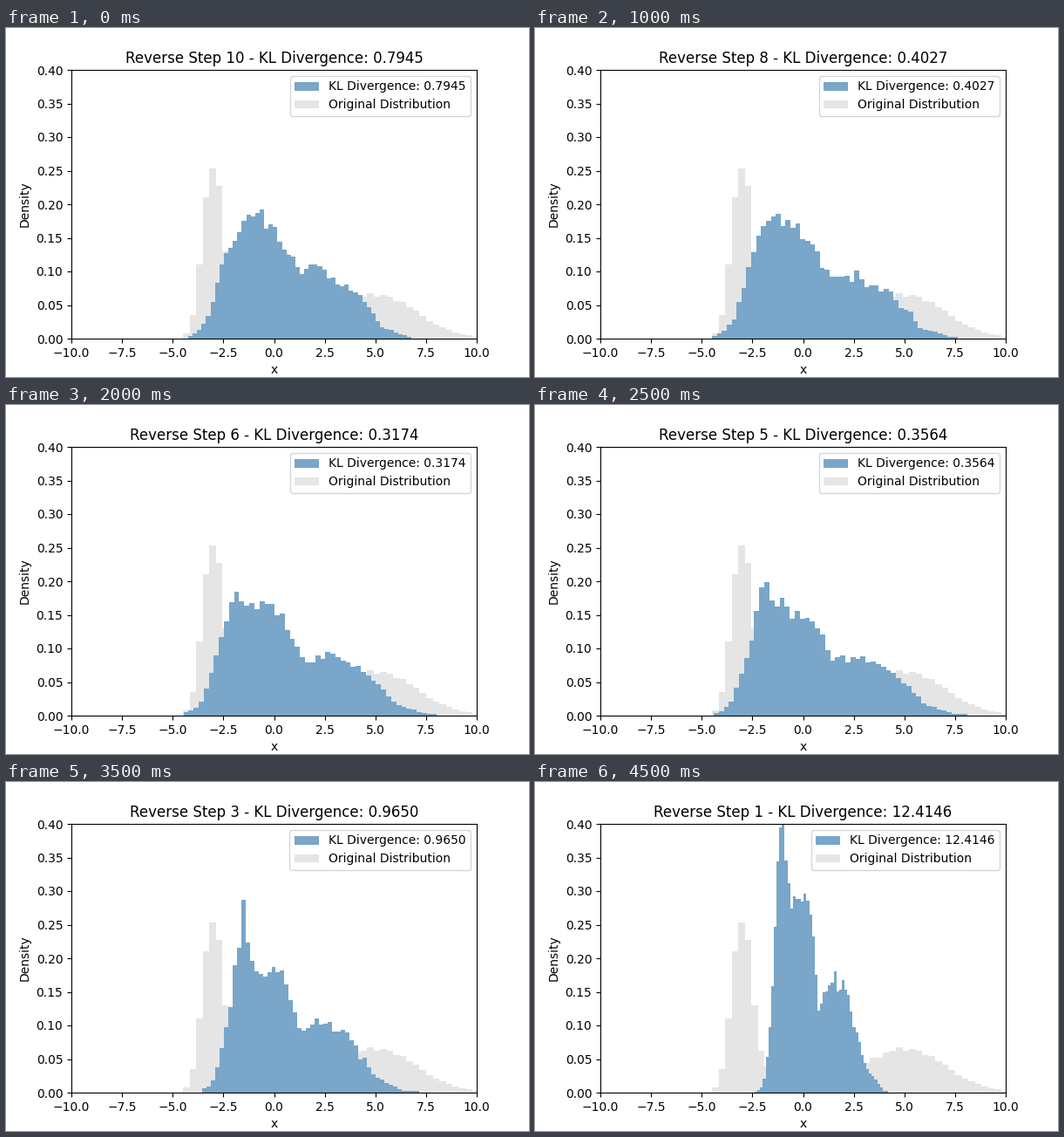
A matplotlib script for the animation above (5 s loop, 600 by 400 pixels).

```python
import numpy as np
import matplotlib.pyplot as plt
from matplotlib.animation import FuncAnimation

BINS = 50
CENTER, UNIT = 307.5, 23.25    # pixel of x = 0, pixels per unit of x
PIVOT = 305                    # pixel about which the samples spread out
BLUE = "#79a6c9"
GRAY = "#e5e5e5"

KL = [0.7945, 0.5342, 0.4027, 0.3204, 0.3174,
      0.3564, 0.5128, 0.9650, 2.8212, 12.4146]

# outer edges of the blue bars at a few steps
KEYS = [1, 2, 3, 5, 7, 9, 10]
LEFT = [249, 234.3, 225, 205, 202, 204, 209]
RIGHT = [405, 441.8, 473.5, 495.5, 493, 476, 465]

# outlines of the first and last step: (distance from pivot, height)
SHARP = [(-52, 0), (-43, .01), (-38, .06), (-32, .165), (-26, .35),
         (-21, .43), (-16, .34), (-11, .28), (5, .30), (11, .27),
         (19, .14), (38, .165), (54, .145), (64, .09), (75, .038), (95, .003)]
SOFT = [(-58, .003), (-49, .026), (-43, .065), (-34, .19), (-20, .29),
        (-10, .325), (2, .27), (18, .175), (38, .17), (47, .13),
        (60, .11), (70, .07), (76, .028), (96, .005)]


def noisy(tops, seed, amount):
    """Uneven bar tops, as from a finite sample."""
    rng = np.random.default_rng(seed)
    return tops * (1 + amount * rng.standard_normal(len(tops)))


def normal(x, mean, sd):
    return np.exp(-((x - mean) / sd) ** 2 / 2) / (sd * np.sqrt(2 * np.pi))


def outline(points, u):
    return np.interp(u, *zip(*points))


def base_bars():
    """Equal mixture of three normal distributions."""
    width = 7.54
    edges = 203.05 + width * np.arange(45)
    x = (edges + width / 2 - CENTER) / UNIT
    tops = sum(normal(x, m, s) for m, s in ((-3, .5), (0, 1), (5, 2))) / 3
    return edges, width, noisy(tops, 4, .03)


def step_bars(step):
    """Outline that spreads with the step and softens towards step 10."""
    left = np.interp(step, KEYS, LEFT)
    width = (np.interp(step, KEYS, RIGHT) - left) / BINS
    edges = left + width * np.arange(BINS)
    scale = width / 3.12
    u = (edges + width / 2 - PIVOT) / scale
    soft = (step - 1) / 9
    tops = (1 - soft) * outline(SHARP, u) + soft * outline(SOFT, u)
    return edges, width, noisy(tops / scale, step, .05)


fig, ax = plt.subplots(figsize=(6, 4), dpi=100)


def bars(edges, width, tops, **style):
    ax.bar((edges - CENTER) / UNIT, tops, width / UNIT, align="edge", **style)


def draw(i):
    step = 10 - i
    text = f"KL Divergence: {KL[i]:.4f}"
    ax.clear()
    bars(*step_bars(step), color=BLUE, label=text, zorder=2)
    bars(*base_bars(), color=GRAY, label="Original Distribution", zorder=1)
    ax.set(xlim=(-10, 10), ylim=(0, 0.4), xlabel="x", ylabel="Density",
           title=f"Reverse Step {step} - {text}")
    ax.legend(loc="upper right")
    return []


anim = FuncAnimation(fig, draw, frames=10, interval=500, repeat=True)
plt.show()
```
